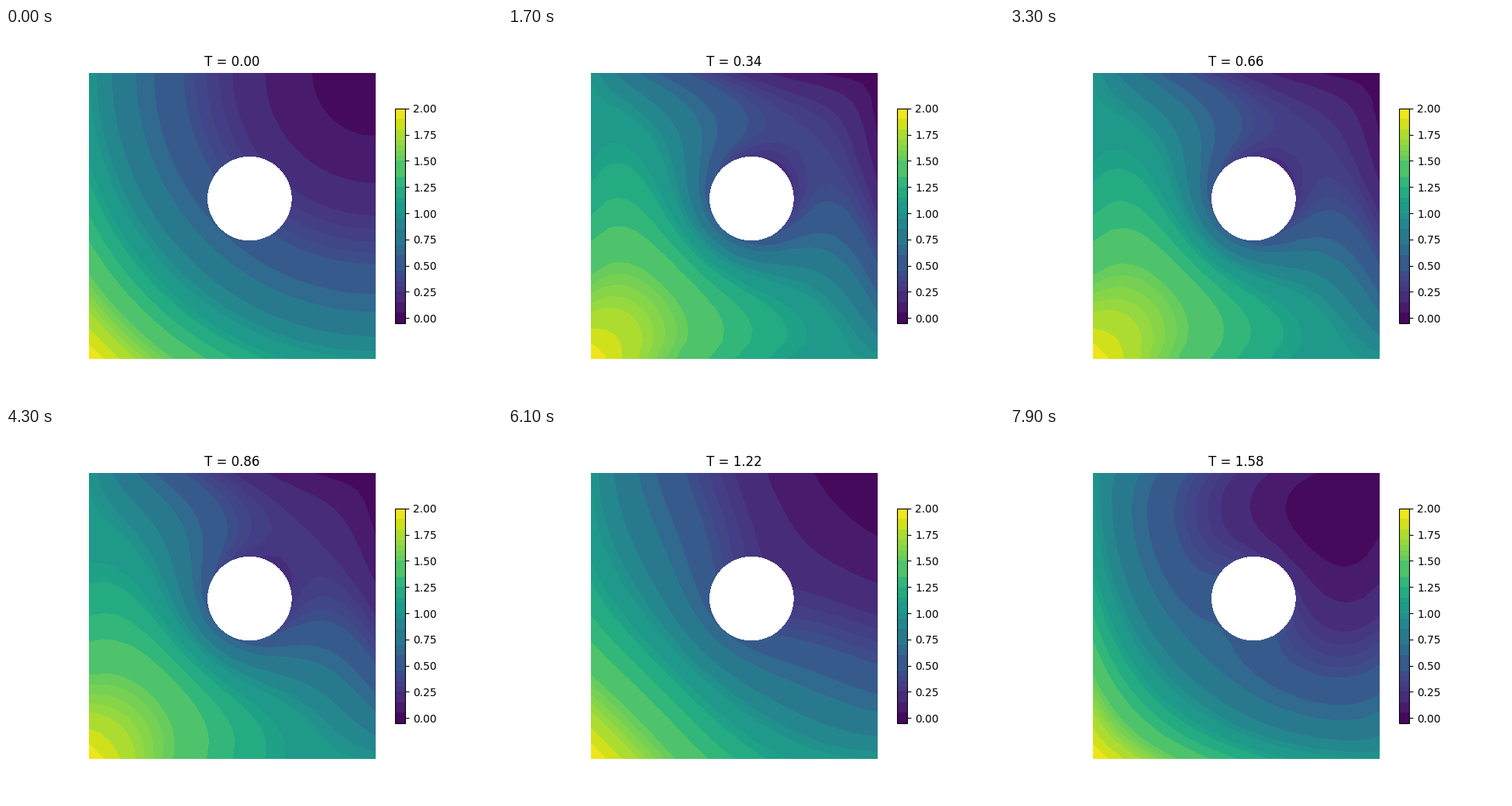
Recreate the animation shown at these times as a matplotlib script. Size 640 by 480 pixels, loop 8 s.

```python
import numpy as np
import matplotlib.pyplot as plt
from matplotlib.animation import FuncAnimation
from matplotlib.tri import Triangulation

FRAMES, DT = 80, 0.02
CENTRE, RADIUS = 0.5605, 0.1485    # circular hole in the unit square
DIFFUSION, DRIVE = 0.1, 15.0
LEVELS = [-.05, .05, .15, .25, .3, .35, .4, .45, .6, .7, .85, .95, 1, 1.1,
          1.15, 1.25, 1.35, 1.5, 1.55, 1.6, 1.65, 1.7, 1.8, 1.9, 2]


def build_mesh(h=0.045, n_side=22, n_hole=48):
    """Triangulate the square around the hole; also flag the free nodes."""
    s = np.linspace(0, 1, n_side + 1)[:-1]
    zero, one = np.zeros(n_side), np.ones(n_side)
    side = np.column_stack([np.r_[s, one, 1 - s, zero],
                            np.r_[zero, s, one, 1 - s]])
    a = np.linspace(0, 2 * np.pi, n_hole, endpoint=False)
    hole = CENTRE + RADIUS * np.column_stack([np.cos(a), np.sin(a)])

    rng = np.random.default_rng(4)
    rows = np.arange(h / 2, 1, h * np.sqrt(3) / 2)
    inner = np.array([(x + (j % 2) * h / 2, y)
                      for j, y in enumerate(rows)
                      for x in np.arange(0, 1, h)])
    inner += rng.uniform(-0.12 * h, 0.12 * h, inner.shape)
    edge_gap = np.minimum(inner, 1 - inner).min(axis=1)
    hole_gap = np.hypot(*(inner - CENTRE).T) - RADIUS
    inner = inner[(edge_gap > 0.6 * h) & (hole_gap > 0.6 * h)]

    pts = np.vstack([side, hole, inner])
    tri = Triangulation(pts[:, 0], pts[:, 1])
    idx = np.arange(len(pts))
    on_hole = (idx >= len(side)) & (idx < len(side) + n_hole)
    tri.set_mask(on_hole[tri.triangles].all(axis=1))
    return tri, idx >= len(side) + n_hole


def assemble(tri):
    """Stiffness matrix and lumped mass for linear elements."""
    t = tri.get_masked_triangles()
    x, y = tri.x[t], tri.y[t]
    b = np.roll(y, -1, axis=1) - np.roll(y, -2, axis=1)
    c = np.roll(x, -2, axis=1) - np.roll(x, -1, axis=1)
    area = 0.5 * np.abs(b[:, 0] * c[:, 1] - b[:, 1] * c[:, 0])
    area = np.maximum(area, 1e-12)
    n = len(tri.x)
    stiff, mass = np.zeros((n, n)), np.zeros(n)
    for i in range(3):
        np.add.at(mass, t[:, i], area / 3)
        for j in range(3):
            val = (b[:, i] * b[:, j] + c[:, i] * c[:, j]) / (4 * area)
            np.add.at(stiff, (t[:, i], t[:, j]), val)
    return stiff, mass


def solve(tri, free):
    """Implicit Euler for the heat equation with a cosine source."""
    base = (1 - tri.x) ** 2 + (1 - tri.y) ** 2
    stiff, mass = assemble(tri)
    m = mass[free]
    step = np.linalg.inv(np.diag(m) + DIFFUSION * DT * stiff[np.ix_(free, free)])
    v = np.zeros(len(m))
    fields = []
    for k in range(FRAMES):
        if k:
            source = DIFFUSION * (4 + DRIVE * np.cos(np.pi / 2 * k * DT))
            v = step @ (m * (v + DT * source))
        u = base.copy()
        u[free] += v
        fields.append(np.clip(u, -0.049, 2))
    return fields


mesh, free_nodes = build_mesh()
fields = solve(mesh, free_nodes)

fig, ax = plt.subplots(figsize=(6.4, 4.8), dpi=100)
ax.set_aspect("equal")
ax.set(xlim=(0, 1), ylim=(0, 1))
ax.axis("off")


def draw_field(k):
    ax.set_title(f"T = {k * DT:.2f}")
    return ax.tricontourf(mesh, fields[k], levels=LEVELS, cmap="viridis")


state = {"fill": draw_field(0)}
bar = fig.colorbar(state["fill"], ax=ax, shrink=0.75, spacing="proportional",
                   ticks=np.arange(0, 2.01, 0.25))
bar.minorticks_off()


def update(k):
    state["fill"].remove()
    state["fill"] = draw_field(k)
    ax.set(xlim=(0, 1), ylim=(0, 1))
    return []


anim = FuncAnimation(fig, update, frames=FRAMES, interval=100,
                     repeat=True, repeat_delay=0, blit=False)
plt.show()
```
